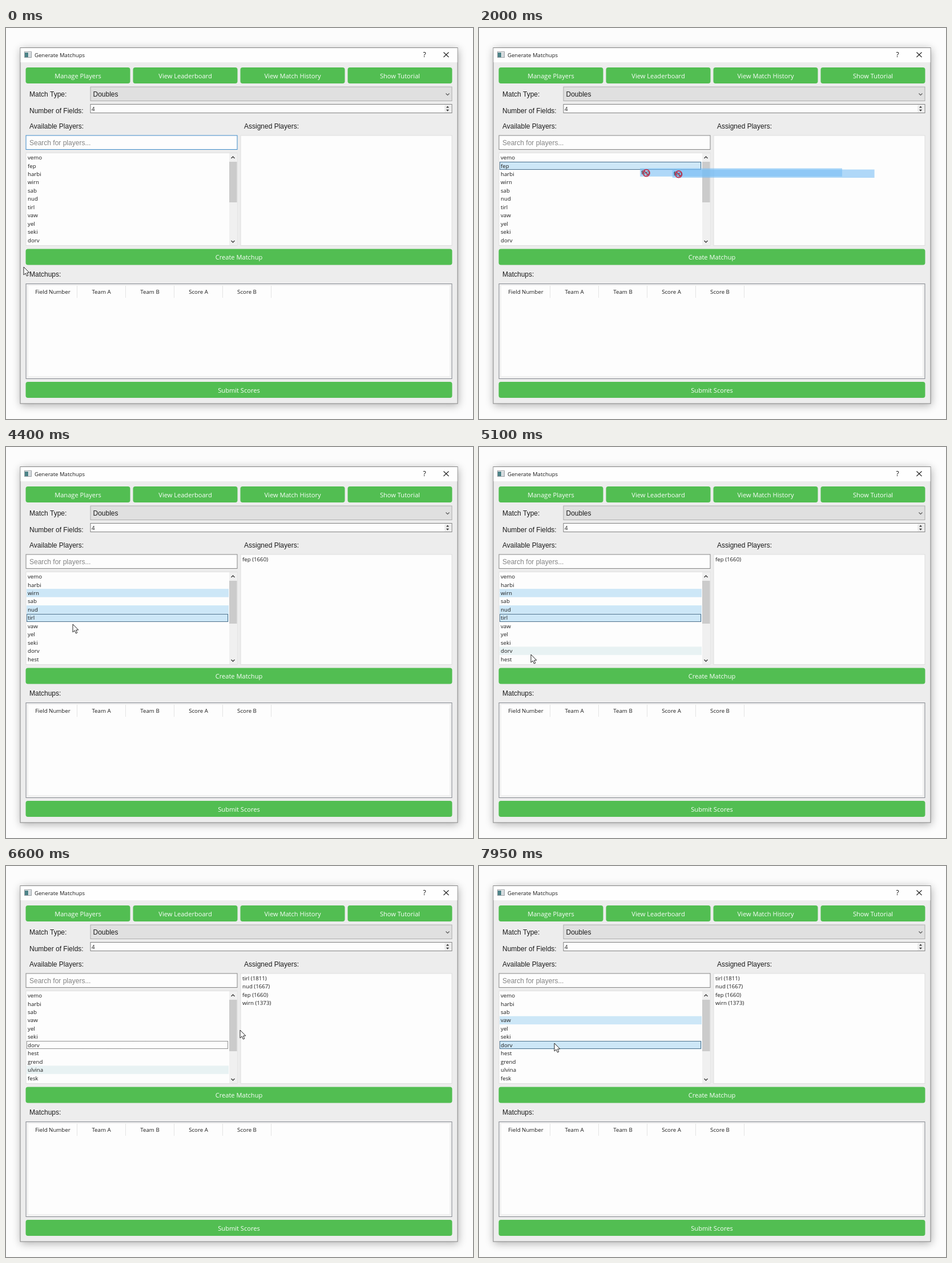
Write an HTML page with a canvas that moves like this. It is 818 px wide and 684 px high and loops after 8000 ms.

```html
<!DOCTYPE html>
<html lang="en">
<head>
<meta charset="utf-8">
<title>Generate Matchups</title>
<style>
html, body { margin: 0; width: 100%; height: 100%; overflow: hidden; background: #fcfcfc; }
canvas { display: block; }
</style>
</head>
<body>
<canvas id="stage" width="818" height="684"></canvas>
<script>
const ctx = document.getElementById('stage').getContext('2d');
const LOOP = 8000, STEP = 50;
const ROW = 14.45, LIST_TOP = 219.3;
const UI = '"Open Sans", "Noto Sans", sans-serif';
const ARIAL = '"Liberation Sans", Arial, sans-serif';
const GREEN = '#52be52', INK = '#1c1c1c', PAPER = '#fdfdfd';

const players = ['vemo', 'fep', 'harbi', 'wirn', 'sab', 'nud', 'tirl', 'vaw', 'yel',
  'seki', 'dorv', 'hest', 'grend', 'ulvina', 'fesk'];
const first = 'fep', group = ['wirn', 'nud', 'tirl'];

// Pointer path: time, x, y
const path = [
  [0, 31, 418], [250, 31, 418], [1000, 47, 242], [1550, 47, 242], [1650, 52, 243],
  [2250, 520, 262], [2400, 520, 262], [2850, 186, 259], [3100, 186, 259],
  [3450, 150, 284], [3560, 150, 284], [3900, 125, 297], [4080, 125, 297],
  [4300, 118, 303], [4400, 117, 310], [5000, 91, 363], [5350, 91, 363],
  [5800, 156, 355], [5850, 163, 353], [6250, 470, 290], [6350, 470, 290],
  [6600, 410, 287], [7150, 140, 268], [7300, 140, 268], [7750, 132, 310], [8000, 132, 310]
];
const drags = [
  { from: 1600, to: 2300, x: 47, y: 242, names: [first] },
  { from: 5350, to: 6300, x: 91, y: 363, names: group }
];

// Monotone cubic through the path, so that holds stay still
const slope = (i, k) => (path[i + 1][k] - path[i][k]) / (path[i + 1][0] - path[i][0]);
function tangent(i, k) {
  if (i === 0 || i === path.length - 1) return 0;
  const a = slope(i - 1, k), b = slope(i, k);
  return a * b <= 0 ? 0 : 2 * a * b / (a + b);
}
function pointer(t) {
  let i = 0;
  while (i < path.length - 2 && path[i + 1][0] <= t) i++;
  const h = path[i + 1][0] - path[i][0];
  const u = Math.max(0, (t - path[i][0]) / h), v = 1 - u;
  const at = k => path[i][k] * v * v * (1 + 2 * u) + path[i + 1][k] * u * u * (3 - 2 * u) +
    h * u * v * (v * tangent(i, k) - u * tangent(i + 1, k));
  return { x: at(1), y: at(2) };
}

function stateAt(t) {
  const s = { gone: [], picked: [], focus: null, assigned: [], thumb: 71 };
  if (t >= 1500) { s.picked = [first]; s.focus = first; }
  if (t >= 2300) {
    s.gone = [first];
    s.picked = [];
    s.focus = 'harbi';
    s.assigned = [first + ' (1660)'];
    s.thumb = 75;
  }
  [2880, 3500, 4000].forEach((at, i) => {
    if (t >= at) { s.picked.push(group[i]); s.focus = group[i]; }
  });
  if (t >= 5200) s.focus = 'dorv';
  if (t >= 6300) {
    s.gone = [first, ...group];
    s.picked = [];
    s.assigned = ['tirl (1811)', 'nud (1667)', first + ' (1660)', 'wirn (1373)'];
    s.thumb = 90;
  }
  if (t >= 7230) { s.picked.push('vaw'); s.focus = 'vaw'; }
  if (t >= 7800) { s.picked.push('dorv'); s.focus = 'dorv'; }
  s.list = players.filter(n => !s.gone.includes(n)).slice(0, 11);
  s.drag = drags.find(d => t >= d.from && t < d.to);
  return s;
}

function fill(x, y, w, h, color) {
  ctx.fillStyle = color;
  ctx.fillRect(x, y, w, h);
}
function box(x, y, w, h, color, border) {
  fill(x, y, w, h, border);
  fill(x + 1, y + 1, w - 2, h - 2, color);
}
function text(str, x, y, size = 9.7, color = INK, align = 'left', family = UI) {
  ctx.font = size + 'px ' + family;
  ctx.fillStyle = color;
  ctx.textAlign = align;
  ctx.fillText(str, x, y);
}
const label = (str, x, y, color = INK) => text(str, x, y, 12, color, 'left', ARIAL);
function line(points, color, width = 1) {
  ctx.beginPath();
  points.forEach(p => ctx.lineTo(p[0], p[1]));
  ctx.strokeStyle = color;
  ctx.lineWidth = width;
  ctx.stroke();
}
function triangle(x, y, dir) {
  ctx.beginPath();
  ctx.moveTo(x - 2.5, y);
  ctx.lineTo(x + 2.5, y);
  ctx.lineTo(x, y - 3 * dir);
  ctx.fillStyle = '#333';
  ctx.fill();
}
function chevron(x, y, dir, color, width) {
  line([[x - 3, y - 1.5 * dir], [x, y + 1.5 * dir], [x + 3, y - 1.5 * dir]], color, width);
}
function button(str, x, y, w) {
  ctx.beginPath();
  ctx.roundRect(x, y, w, 28, 4);
  ctx.fillStyle = GREEN;
  ctx.fill();
  text(str, x + w / 2, y + 18.7, 11.1, '#fafffa', 'center');
}

function drawWindow() {
  fill(0, 0, 818, 684, '#fcfcfc');
  ctx.save();
  ctx.shadowColor = 'rgba(0,0,0,.32)';
  ctx.shadowBlur = 14;
  ctx.shadowOffsetX = 1;
  ctx.shadowOffsetY = 3;
  fill(25, 34, 766, 623, '#888');
  ctx.restore();
  box(24.5, 34, 767, 623.5, '#ededed', '#858585');
  fill(25.5, 35, 765, 25, '#fefefe');

  box(32, 41, 13, 11, '#f4f4f4', '#9aa0a4');
  fill(33, 43, 6, 8, '#4d8388');
  fill(40, 43, 4, 8, '#d5dadd');
  text('Generate Matchups', 50, 50.6, 9.6);
  text('?', 733, 51, 12, '#111', 'center', '600 12px "Open Sans"' && UI);
  line([[766.5, 42.5], [775.5, 51]], '#222', 1.1);
  line([[775.5, 42.5], [766.5, 51]], '#222', 1.1);

  ['Manage Players', 'View Leaderboard', 'View Match History', 'Show Tutorial']
    .forEach((str, i) => button(str, 34.5 + 188 * i, 69, 183));
  button('Create Matchup', 34.5, 386.5, 747);
  button('Submit Scores', 34.5, 619, 747);

  label('Match Type:', 41, 119.5);
  label('Number of Fields:', 41, 148.5);
  label('Available Players:', 41, 175.5);
  label('Assigned Players:', 417, 175.5);
  label('Matchups:', 41, 435);

  box(147.5, 102.5, 634, 25.5, '#e0e0e0', '#adadad');
  label('Doubles', 152.5, 119.5);
  chevron(773.5, 116, 1, '#555', 1.1);
  box(147.5, 133, 634, 16, PAPER, '#7f7f7f');
  text('4', 150, 144.8);
  fill(768, 134.5, 11.5, 13, '#ececec');
  triangle(773.5, 139.5, 1);
  triangle(773.5, 142.8, -1);
}

function drawTable() {
  box(34.5, 447, 747, 167, '#f1f1f1', '#858890');
  fill(39, 451, 738, 158, PAPER);
  ['Field Number', 'Team A', 'Team B', 'Score A', 'Score B'].forEach((str, i) => {
    text(str, 82 + 85 * i, 465.3, 9.7, INK, 'center');
    fill(124 + 85 * i, 451, 1, 21, '#e4e4e4');
  });
}

function drawRows(s, hover) {
  s.list.forEach((name, i) => {
    const y = LIST_TOP + ROW * i, chosen = s.picked.includes(name);
    if (chosen || i === hover) fill(36, y, 354, ROW, chosen ? '#cde7f7' : '#e8f2f3');
    if (name === s.focus) {
      ctx.setLineDash([1, 1]);
      ctx.strokeStyle = '#222';
      ctx.lineWidth = 1;
      ctx.strokeRect(36.5, Math.round(y) + .5, 352, 13);
      ctx.setLineDash([]);
      if (chosen) {
        ctx.strokeStyle = 'rgba(50,100,140,.6)';
        ctx.strokeRect(36.5, Math.round(y) + .5, 352, 13);
      }
    }
    text(name, 38, y + 10.8);
  });
}

function drawLists(t, s) {
  const searching = t < 1500;
  box(34.5, 187.5, 371, 25.5, PAPER, searching ? '#3f8bc9' : '#858585');
  label('Search for players...', 41, 204.5, '#858585');
  if (searching && (t + 830) % 1060 < 530) fill(41, 193, 1, 14, '#111');

  box(34.5, 218, 371, 163, PAPER, '#dedede');
  box(410.5, 187.5, 371, 193.5, PAPER, '#dedede');
  s.assigned.forEach((str, i) => text(str, 414, 199.6 + ROW * i));

  const p = pointer(Math.max(0, t - 80));
  let hover = -1;
  if (!s.drag && p.x > 36 && p.x < 390 && p.y > LIST_TOP && p.y < 379)
    hover = Math.floor((p.y - LIST_TOP) / ROW);
  else if (t >= 6300 && t < 6800) hover = 9;
  drawRows(s, hover);

  fill(391, 219, 13.5, 161, '#f0f0f0');
  fill(391, 234, 13.5, s.thumb, '#cbcbcb');
  chevron(397.5, 226.5, -1, '#444', 1.5);
  chevron(397.5, 373.5, 1, '#444', 1.5);
}

function drawGhost(s, p) {
  const dx = p.x - s.drag.x, dy = p.y - s.drag.y;
  s.drag.names.forEach(name => {
    const y = LIST_TOP + ROW * s.list.indexOf(name) + dy;
    fill(36 + dx, y, 354, ROW, 'rgba(120,190,245,.58)');
    text(name, 38 + dx, y + 10.8, 9.7, 'rgba(15,25,35,.9)');
  });
}

function drawArrow(p) {
  ctx.save();
  ctx.translate(p.x, p.y);
  ctx.beginPath();
  [[0, 0], [0, 14], [3.2, 11], [5.4, 16], [7.8, 15], [5.6, 10.2], [9.8, 10]]
    .forEach(q => ctx.lineTo(q[0], q[1]));
  ctx.closePath();
  ctx.fillStyle = '#fff';
  ctx.fill();
  ctx.strokeStyle = '#222';
  ctx.lineWidth = 1;
  ctx.stroke();
  ctx.restore();
}
function drawForbidden(p) {
  ctx.beginPath();
  ctx.arc(p.x, p.y, 5.8, 0, 7);
  ctx.strokeStyle = '#bd3c58';
  ctx.lineWidth = 2;
  ctx.stroke();
  line([[p.x - 4, p.y - 4], [p.x + 4, p.y + 4]], '#bd3c58', 2);
}

function draw(t) {
  const s = stateAt(t), now = pointer(t);
  drawWindow();
  drawTable();
  drawLists(t, s);
  if (!s.drag) return drawArrow(now);
  // A dragged item leaves its previous position visible for one step
  const before = pointer(Math.max(s.drag.from, t - STEP));
  const spots = Math.hypot(now.x - before.x, now.y - before.y) > 1 ? [before, now] : [now];
  spots.forEach(p => drawGhost(s, p));
  spots.forEach(p => p.x > 411 ? drawArrow(p) : drawForbidden(p));
}

const start = performance.now();
function tick() {
  const t = (performance.now() - start) % LOOP;
  draw(Math.floor(t / STEP) * STEP);
  requestAnimationFrame(tick);
}
tick();
</script>
</body>
</html>
```
